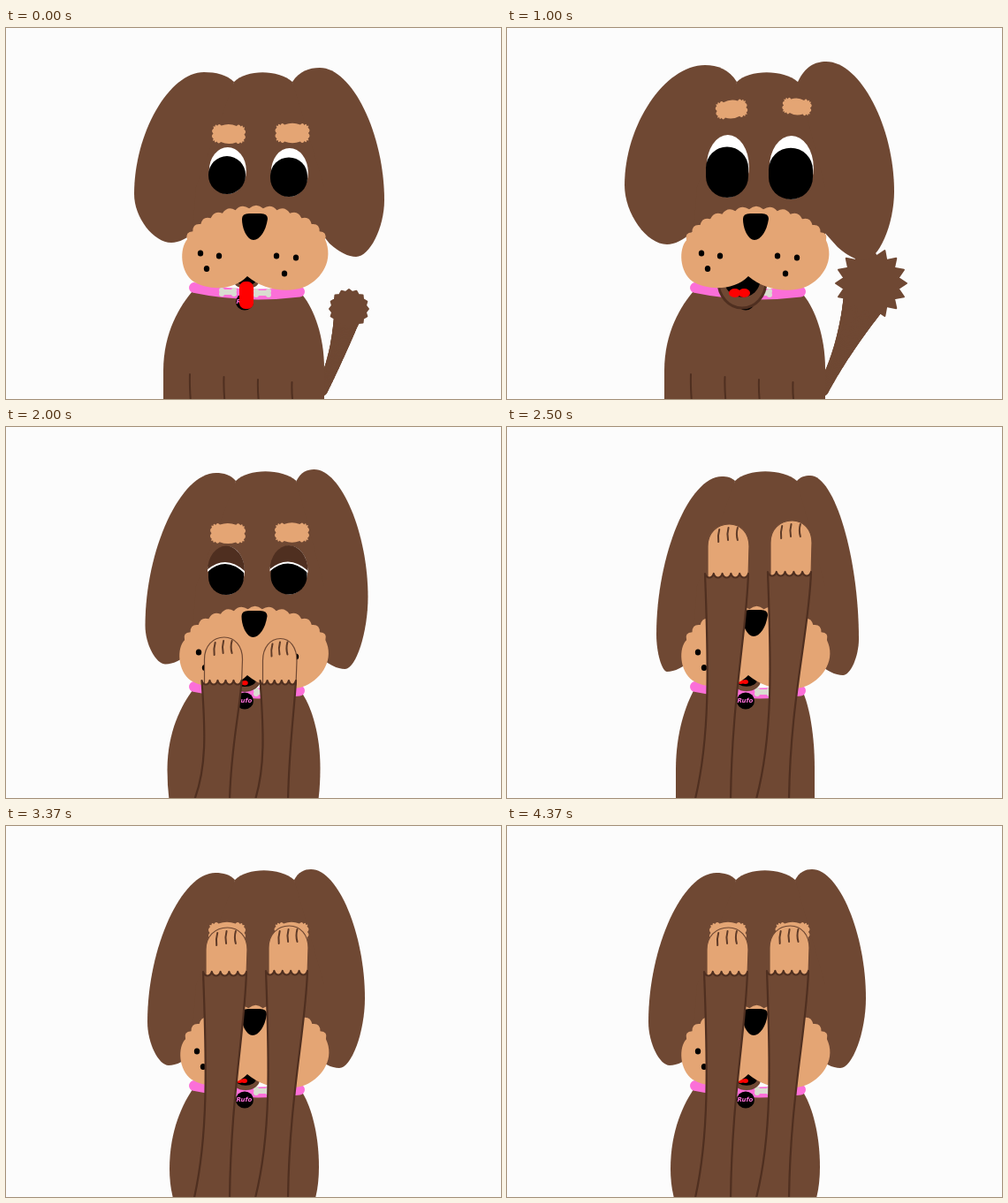
These frames come from a looping animation (560x420 px, 4.5 s). An HTML page with a canvas:

```html
<!DOCTYPE html>
<html lang="en">
<head>
<meta charset="utf-8">
<title>Peekaboo puppy</title>
<style>
  html, body { margin: 0; width: 100%; height: 100%; overflow: hidden; background: #fcfcfc; }
  canvas { display: block; width: 560px; height: 420px; }
</style>
</head>
<body>
<canvas id="stage"></canvas>
<script>
const LOOP = 4500, TAU = Math.PI * 2;
const BROWN = '#6f4833', DARK = '#4f2f20', TAN = '#e4a574', PINK = '#fb6fd8', BONE = '#d9ddd0';
const canvas = document.getElementById('stage');
const dpr = window.devicePixelRatio || 1;
canvas.width = 560 * dpr;
canvas.height = 420 * dpr;
const c = canvas.getContext('2d');

// ear: crown x, top x/y, side x/y, bottom x/y     tail: tip x/y, bend x/y, tuft radius, tooth depth
// body: left, right, pinch at the floor           muzzle: left, right, drop, left dot shift
// eye: x, top, half width, bottom, lid 0..1       brow: x, y, width, tilt
// jaw: x, half width, bottom                      tongue: x, top, width, bottom
// arm: paw left, paw right, paw top, cuff
const sit = {
  earL: [258, 224, 50, 145, 188, 187, 243], earR: [324, 355, 45, 428, 195, 396, 259],
  tail: [388, 318, 376, 372, 22, 0.12], reach: 1, legs: 0,
  body: [178, 360, 0], muzzle: [199, 367, 0, 0], nose: [267, 210],
  eyeL: [250, 135, 21, 188, 0], eyeR: [320, 136, 21, 191, 0],
  browL: [252, 120, 39, 0.03], browR: [324, 119, 40, 0],
  jaw: [272, 14, 295], tongue: [272, 287, 16, 318],
  armL: [223, 262, 426, 472], armR: [284, 316, 426, 472]
};
const happy = { ...sit,
  earL: [260, 224, 42, 133, 178, 181, 245], earR: [329, 361, 38, 438, 185, 404, 263],
  tail: [412, 289, 385, 358, 40, 0.22], muzzle: [197, 367, 1, 0],
  eyeL: [249, 121, 24, 192, 0], eyeR: [321, 122, 25, 194, 0],
  browL: [254, 92, 37, -0.12], browR: [328, 89, 34, 0.1],
  jaw: [266, 27, 317], tongue: [263, 295, 24, 305]
};
const blink = { ...sit,
  earL: [261, 238, 51, 155, 228, 177, 266], earR: [331, 352, 47, 413, 190, 390, 274],
  tail: [432, 367, 410, 410, 20, 0.22], legs: 32,
  body: [180, 357, 0], muzzle: [195, 367, 2, 0], nose: [267, 209],
  eyeL: [249, 130, 24, 195, 1], eyeR: [320, 129, 25, 194, 1],
  jaw: [269, 19, 300], tongue: [268, 288, 13, 294],
  armL: [223, 262, 361, 411], armR: [284, 316, 366, 412]
};
const hide = { ...blink,
  earL: [259, 237, 53, 160, 222, 184, 271], earR: [326, 345, 49, 406, 195, 377, 274],
  reach: 0, body: [185, 354, 5], muzzle: [197, 368, 2, -4], nose: [266, 207],
  eyeL: [249, 140, 16, 185, 1], eyeR: [320, 140, 16, 185, 1],
  browL: [250, 121, 43, 0], browR: [323, 120, 40, 0],
  jaw: [271, 16, 299], tongue: [267, 286, 12, 291],
  armL: [226, 273, 115, 167], armR: [297, 342, 113, 166]
};
const low = { ...hide,
  earL: [258, 243, 56, 169, 235, 181, 277], earR: [328, 343, 55, 398, 240, 380, 281],
  body: [191, 348, 0], browL: [250, 126, 30, 0], browR: [321, 124, 30, 0],
  armL: [227, 274, 110, 168], armR: [298, 345, 106, 166]
};
const peekR = { ...hide,
  earL: [260, 228, 33, 128, 165, 180, 262], earR: [323, 353, 31, 445, 165, 386, 275],
  body: [167, 372, 4], muzzle: [197, 370, 1, -4], nose: [269, 208],
  eyeR: [321, 116, 25, 198, 0],
  browL: [242, 91, 44, -0.15], browR: [342, 90, 42, 0.35],
  jaw: [270, 18, 303], tongue: [268, 290, 16, 299],
  armL: [225, 271, 125, 168], armR: [297, 338, 206, 249]
};
const peekL = { ...peekR,
  earL: [260, 224, 42, 127, 165, 180, 255], earR: [326, 358, 42, 434, 185, 400, 265],
  eyeL: [249, 116, 25, 198, 0], eyeR: hide.eyeR,
  armL: [229, 270, 206, 249], armR: [297, 343, 122, 167]
};
const wag = { ...mix(sit, blink, 0.25),
  tail: [440, 365, 410, 408, 25, 0.22], legs: 0, armL: sit.armL, armR: sit.armR };

const blend = (a, b, ...times) => times.map((t, i) => [t, mix(a, b, (i + 1) / times.length)]);
const wobbles = [mix(low, hide, 1.1), low, hide];
const wobble = (...times) => times.map((t, i) => [t, wobbles[i % 3]]);

const steps = [
  [0, sit],
  ...blend(sit, wag, 250, 370, 500),
  ...blend(wag, happy, 750, 870, 1000),
  ...blend(happy, blink, 1250, 1370, 1500),
  ...blend(blink, hide, 1750, 2000, 2120, 2250),
  ...wobble(2250, 2500, 2620, 2750, 2870, 3000, 3120, 3250, 3370),
  ...blend(hide, peekL, 3500, 3620),
  [3750, peekR],
  ...wobble(4000, 4250, 4370)
];

function mix(a, b, t) {
  if (typeof a === 'number') return a + (b - a) * t;
  if (Array.isArray(a)) return a.map((v, i) => mix(v, b[i], t));
  return Object.fromEntries(Object.keys(a).map(k => [k, mix(a[k], b[k], t)]));
}

function fill(color) { c.fillStyle = color; c.fill(); }

function stroke(color, width) {
  c.strokeStyle = color;
  c.lineWidth = width;
  c.stroke();
}

function oval(x, y, rx, ry, color) {
  c.beginPath();
  c.ellipse(x, y, rx, ry, 0, 0, TAU);
  if (color) fill(color);
}

// Row of outward scallops along [x, y] points, clockwise.
function scallops(points, k) {
  points.forEach(([x, y], i) => {
    if (!i) return c.lineTo(x, y);
    const [px, py] = points[i - 1], dx = x - px, dy = y - py, len = Math.hypot(dx, dy) || 1;
    c.quadraticCurveTo(x - dx / 2 + dy / len * k, y - dy / 2 - dx / len * k, x, y);
  });
}

function drawTail([tx, ty, bx, by, r, depth], reach) {
  if (reach < 0.9) return;
  for (let i = 0; i <= 60; i++) {
    const s = i / 60, a = (1 - s) ** 2, b = 2 * s * (1 - s), d = s * s;
    const w = 7 + (r * 0.75 - 7) * d;
    oval(a * 357 + b * bx + d * tx, a * 410 + b * by + d * ty, w, w, BROWN);
  }
  c.beginPath();
  for (let i = 0; i < 32; i++) {
    const a = i / 32 * TAU, d = r * (1 - depth * (i % 2));
    c.lineTo(tx + d * Math.cos(a), ty + d * Math.sin(a));
  }
  c.closePath();
  fill(BROWN);
  stroke(BROWN, 2);
}

function drawBody([l, r, pinch], legs) {
  c.beginPath();
  c.moveTo(l + pinch, 425);
  c.quadraticCurveTo(l, 408, l, 388);
  c.bezierCurveTo(l, 345, mix(212, l, 0.45), 314, 212, 297);
  c.lineTo(336, 303);
  c.bezierCurveTo(mix(336, r, 0.5), 318, r, 348, r, 386);
  c.quadraticCurveTo(r, 408, r - pinch, 425);
  fill(BROWN);
  for (let i = 0; i < 4; i++) {
    const x = 208 + i * 38.5, y = 392 + i * 3 + legs;
    c.beginPath();
    c.moveTo(x, y);
    c.quadraticCurveTo(x - 0.5, y + 12, x + 1, 424 + legs);
    stroke(DARK, 2);
  }
}

// side is 1 for the left ear and -1 for the right one.
function drawEar([x, tx, ty, sx, sy, bx, by], side) {
  c.beginPath();
  c.moveTo(x, 61);
  c.bezierCurveTo(mix(x, tx, 0.25), 61 + (ty - 61) * 0.75, mix(x, tx, 0.6), ty, tx, ty);
  c.bezierCurveTo(mix(tx, sx, 0.5), ty, sx, mix(sy, ty, 0.5), sx, sy);
  c.bezierCurveTo(sx, mix(sy, by, 0.48), mix(bx, sx, 0.48), by, bx, by);
  c.quadraticCurveTo(bx + side * 13, by, bx + side * 30, by - 15);
  c.lineTo(283 - side * 48, 200);
  c.closePath();
  fill(BROWN);
}

function drawSkull(l, r) {
  c.beginPath();
  c.moveTo(l, 61);
  c.bezierCurveTo(l + 14, 46.5, r - 16, 46.5, r, 61);
  c.lineTo(360, 180);
  c.lineTo(360, 250);
  c.lineTo(274, 280);
  c.lineTo(210, 245);
  c.lineTo(215, 180);
  fill(BROWN);
}

function drawBone(x, y) {
  c.fillStyle = BONE;
  c.fillRect(x - 7, y - 3, 14, 6);
  [-7, 7].forEach(dx => [-2, 2].forEach(dy => oval(x + dx, y + dy, 3, 3, BONE)));
}

function drawCollar() {
  c.beginPath();
  c.moveTo(213, 294);
  c.quadraticCurveTo(270, 306, 332, 298.5);
  stroke(PINK, 12);
  drawBone(251, 299);
  drawBone(290, 300);
  oval(270, 310, 10, 9.5, '#000');
  c.fillStyle = PINK;
  c.font = 'italic bold 7px "DejaVu Sans", sans-serif';
  c.textAlign = 'center';
  c.textBaseline = 'middle';
  c.fillText('Rufo', 269.5, 310);
}

function drawMouth([x, half, bottom], [tx, top, w, end]) {
  oval(x, 287, half, bottom - 287, BROWN);
  stroke(DARK, Math.max(0.1, (half - 15) / 4));
  oval(x, 286, half * 0.75, (bottom - 286) * 0.6, '#000');
  const h = end - top;
  c.beginPath();
  if (h > w) c.roundRect(tx - w / 2, top, w, h, w * 0.42);
  else [-1, 1].forEach(s => c.ellipse(tx + s * w * 0.22, top + h / 2, w * 0.28, h / 2, 0, 0, TAU));
  fill('#f00');
}

function drawMuzzle([l, r, drop, shift]) {
  const cx = (l + r) / 2, rx = (r - l) / 2 - 2;
  const ring = Array.from({ length: 14 }, (_, i) => {
    const a = Math.PI * (1.1 + 0.8 * i / 13);
    return [cx + rx * Math.cos(a), 255 + drop + 51 * Math.sin(a)];
  });
  c.beginPath();
  scallops(ring, 7);
  c.bezierCurveTo(r + 4, 262, r - 9, 284, r - 29, 293);
  c.bezierCurveTo(r - 49, 301, 290, 296, 273, 281);
  c.bezierCurveTo(257, 298, l + 29, 297, l + 13, 287);
  c.bezierCurveTo(l - 2, 276, l - 3, 250, ...ring[0]);
  fill(TAN);
  [[220 + shift, 255], [241, 258], [227 + shift, 272.5], [306, 258], [328, 260], [315, 278]]
    .forEach(([x, y]) => oval(x, y, 3.2, 3.6, '#000'));
}

function drawNose([x, y]) {
  c.beginPath();
  c.moveTo(x, y + 6);
  c.quadraticCurveTo(x, y, x + 8, y);
  c.lineTo(x + 21, y);
  c.quadraticCurveTo(x + 29, y, x + 29, y + 6);
  c.bezierCurveTo(x + 27, y + 20, x + 20, y + 30, x + 13, y + 30);
  c.bezierCurveTo(x + 6, y + 30, x, y + 18, x, y + 6);
  fill('#000');
}

function drawEye([x, top, rx, bottom, lid]) {
  const h = bottom - top, gap = h * 0.19, y = top - 35 + 52 * lid;
  oval(x + 0.8, top + h / 2, rx, h / 2, '#fff');
  c.beginPath();
  c.roundRect(x - rx, top + gap, rx * 2, h - gap, Math.min(rx, (h - gap) / 2));
  fill('#000');
  c.save();
  oval(x, top + h / 2, rx + 1, h / 2 + 0.5);
  c.clip();
  c.beginPath();
  c.moveTo(x - rx - 3, y + 11);
  c.quadraticCurveTo(x, y - 10, x + rx + 3, y + 13);
  stroke('#fff', 4);
  c.lineTo(x + rx + 3, y - 60);
  c.lineTo(x - rx - 3, y - 60);
  fill(DARK);
  c.restore();
}

function drawBrow([x, y, w, tilt]) {
  const a = w / 2 - 2, b = w * 0.29 - 2;
  // Points around a squared-off oval.
  const bend = v => Math.sign(v) * Math.abs(v) ** 0.4;
  const ring = Array.from({ length: 19 }, (_, i) => {
    const t = i / 18 * TAU;
    return [a * bend(Math.cos(t)), b * bend(Math.sin(t))];
  });
  c.save();
  c.translate(x, y);
  c.rotate(tilt);
  c.beginPath();
  scallops(ring, 3.5);
  fill(TAN);
  c.restore();
}

function drawArm([l, r, top, cuff], footL, footR) {
  if (top > 424) return;
  const w = r - l, bend = Math.min(25, (cuff - top) * 0.55);
  c.beginPath();
  c.moveTo(l, cuff + 3);
  c.lineTo(l, top + bend);
  c.bezierCurveTo(l, top + bend * 0.4, l + w * 0.22, top, l + w * 0.52, top);
  c.bezierCurveTo(l + w * 0.8, top, r, top + bend * 0.4, r, top + bend);
  c.lineTo(r - 1, cuff + 3);
  fill(TAN);
  stroke(BROWN, 1.2);
  for (let i = 0; i < 3; i++) {
    const x = l + w * (0.26 + 0.22 * i), y = top + (i ? 4 : 6);
    c.beginPath();
    c.moveTo(x + 1, y);
    c.quadraticCurveTo(x - 1, y + 7, x + i * 0.5, y + 14);
    stroke('#5f3b28', 2);
  }

  const a = l - 3, b = r - 1, s = (b - a) / 5, drop = 425 - cuff, edge = cuff - 2;
  c.beginPath();
  c.moveTo(footL, 425);
  c.bezierCurveTo(a + 6, cuff + drop * 0.72, a + 4, cuff + drop * 0.4, a, edge);
  for (let x = a, i = 0; i < 5; i++, x += s) {
    c.bezierCurveTo(x + s * 0.2, edge + 6, x + s * 0.8, edge + 6, x + s, edge);
  }
  c.bezierCurveTo(b - 2, cuff + drop * 0.25, footR + 1, cuff + drop * 0.55, footR, 425);
  fill(BROWN);
  stroke(DARK, 2.2);
}

function draw(p) {
  c.setTransform(dpr, 0, 0, dpr, 0, 0);
  c.fillStyle = '#fcfcfc';
  c.fillRect(0, 0, 560, 420);
  c.lineCap = c.lineJoin = 'round';
  drawTail(p.tail, p.reach);
  drawBody(p.body, p.legs);
  drawEar(p.earL, 1);
  drawEar(p.earR, -1);
  drawSkull(p.earL[0], p.earR[0]);
  drawCollar();
  drawMouth(p.jaw, p.tongue);
  drawMuzzle(p.muzzle);
  drawNose(p.nose);
  [p.eyeL, p.eyeR].forEach(drawEye);
  [p.browL, p.browR].forEach(drawBrow);
  drawArm(p.armL, 212, 253);
  drawArm(p.armR, 281, 319);
}

let shown;
function tick() {
  const t = performance.now() % LOOP;
  const step = steps.findLast(s => s[0] <= t);
  if (step !== shown) draw((shown = step)[1]);
  requestAnimationFrame(tick);
}
tick();
</script>
</body>
</html>
```
